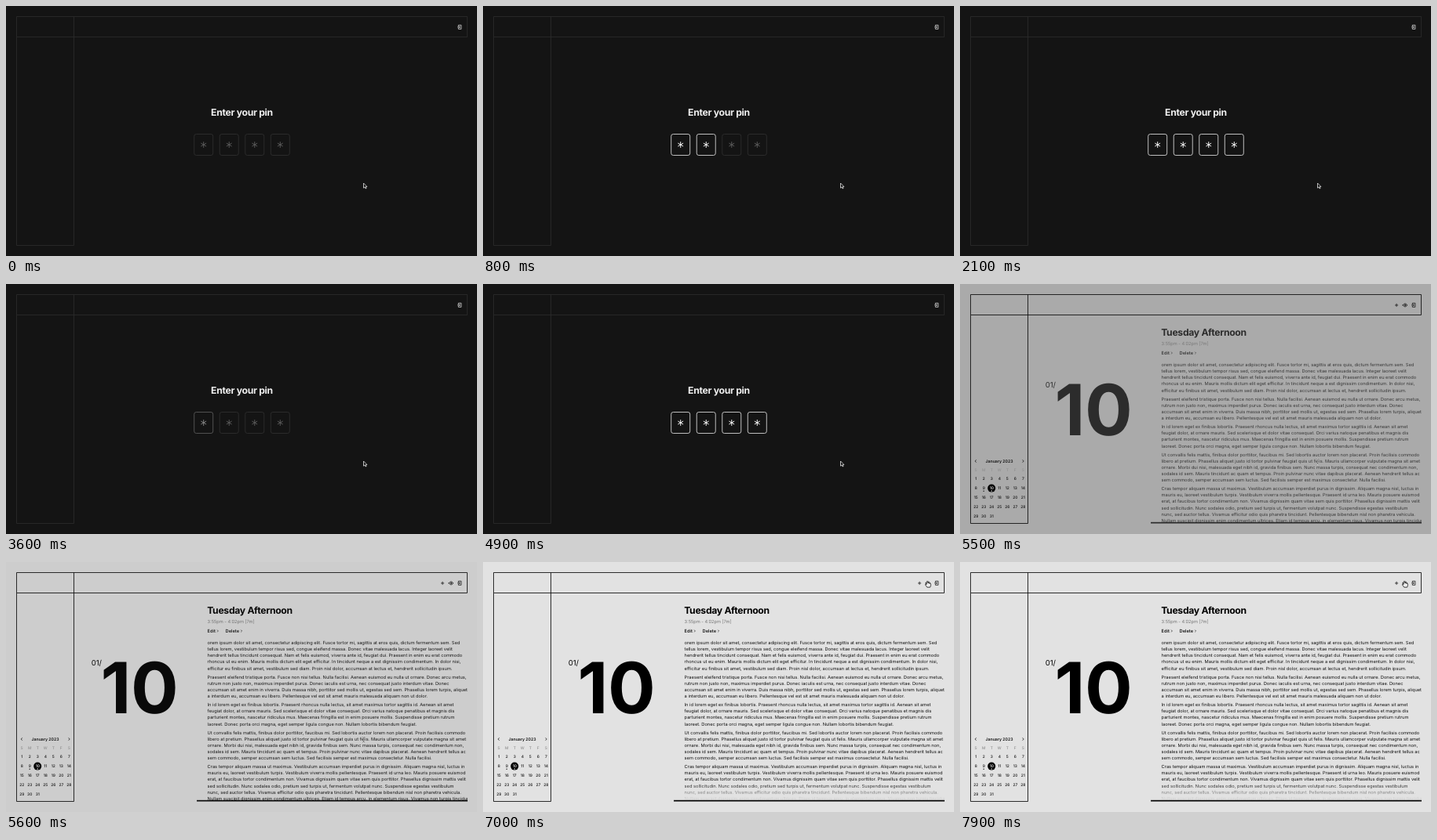
Write an HTML page that moves like this. It is 600 by 319 pixels and loops after 8000 ms.

```html
<!DOCTYPE html>
<html lang="en">
<head>
<meta charset="utf-8">
<title>Journal</title>
<style>
html, body { margin: 0; width: 100%; height: 100%; overflow: hidden; background: #141414; }
svg { display: block; width: 600px; height: 319px; --bg: #141414; --ink: #e2e2e2; --line: #2b2b2b; background: var(--bg); }
text { font-family: Inter, sans-serif; font-optical-sizing: none; text-rendering: geometricPrecision; white-space: pre; }
.grid { fill: none; stroke: var(--line); stroke-width: .85; }
.icon { fill: none; stroke: var(--ink); stroke-width: .75; stroke-linejoin: round; stroke-linecap: round; }
.title { font-size: 12.2px; font-weight: 700; letter-spacing: -.025em; }
.small { font-size: 5.7px; }
.mid { text-anchor: middle; }
.day { font-size: 4.9px; font-weight: 500; text-anchor: middle; }
.chev { fill: none; stroke: #111; stroke-width: .65; }
</style>
</head>
<body>
<svg viewBox="0 0 600 319">
  <defs>
    <linearGradient id="fade" x1="0" y1="0" x2="0" y2="1">
      <stop offset="0" style="stop-color: var(--bg); stop-opacity: 0"/>
      <stop offset=".9" style="stop-color: var(--bg); stop-opacity: .93"/>
    </linearGradient>
    <clipPath id="page"><rect x="250" y="90" width="338" height="214"/></clipPath>
  </defs>

  <path class="grid" d="M13.5 13.5H587.5V39.5H13.5ZM13.5 39.5V305.5H86.5V13.5"/>
  <path class="icon" d="M576.3 25.8V24.4H579.9V29.4H576.3V28M575.4 26.9H578.2M577.2 25.8L578.3 26.9L577.2 28"/>

  <g id="login">
    <text class="title mid" x="300.5" y="140.2" fill="#f0f0f0">Enter your pin</text>
    <g id="pins"></g>
  </g>

  <g id="app">
    <g class="icon">
      <path d="M554.4 27H557.8M556.1 25.3V28.7"/>
      <path d="M564.2 27Q567 22.8 569.8 27Q567 31.2 564.2 27Z"/>
      <circle cx="567" cy="27" r=".8"/>
      <path id="slash" d="M564.7 24.6L569.3 29.4"/>
    </g>
    <g id="calendar">
      <text class="mid" x="50" y="227.9" font-size="5.2" font-weight="600" style="fill: var(--ink)">January 2023</text>
      <path class="icon" d="M20.5 224.6L19.2 226L20.5 227.4M79.9 224.6L81.2 226L79.9 227.4"/>
      <circle cx="40.2" cy="260.6" r="5" fill="#000"/>
      <circle cx="30.2" cy="264.2" r=".7" fill="#111"/>
      <circle cx="40.2" cy="264" r=".7" fill="#fff"/>
    </g>
    <g id="entry">
      <text x="108.7" y="132" font-size="9.5">01/</text>
      <text x="120.5 159" y="193.3" font-size="90" font-weight="700">10</text>
      <text class="title" x="256.2" y="65.6">Tuesday Afternoon</text>
      <text class="small" x="256.6" y="78" font-weight="300" fill="#555">3:55pm - 4:02pm [7m]</text>
      <text class="small" x="256.6" y="90" font-weight="500">Edit</text>
      <text class="small" x="279.6" y="90" font-weight="500">Delete</text>
      <path class="chev" d="M269 86.6L270.4 88L269 89.4M299.2 86.6L300.6 88L299.2 89.4"/>
      <g clip-path="url(#page)"><g id="prose" fill="#111"></g></g>
      <rect id="veil" x="250" y="282" width="338" height="22" fill="url(#fade)"/>
      <rect x="243" y="303.8" width="345" height="1.7"/>
    </g>
  </g>

  <g id="cursor">
    <path id="arrow" d="M0 0V6.2L1.5 4.9L2.5 7L3.6 6.5L2.7 4.5H4.4Z" fill="#111" stroke="#fff" stroke-width=".7"/>
    <g id="beam" fill="none">
      <path d="M-1.6 -3.3Q0 -3.3 0 -2.4V2.4Q0 3.3 -1.6 3.3M1.6 -3.3Q0 -3.3 0 -2.4M0 2.4Q0 3.3 1.6 3.3" stroke="#fff" stroke-width="1.4"/>
      <path d="M-1.6 -3.3Q0 -3.3 0 -2.4V2.4Q0 3.3 -1.6 3.3M1.6 -3.3Q0 -3.3 0 -2.4M0 2.4Q0 3.3 1.6 3.3" stroke="#222" stroke-width=".6"/>
    </g>
    <path id="hand" d="M-1 .6Q-.1 -.6 .8 .6V2.4Q1.6 1.7 2.1 2.6Q3 2 3.4 2.9Q4.4 2.5 4.4 3.6V5Q4.3 6.3 3.6 7.6H-.3Q-1 6.3 -2.6 4.6Q-2.9 3.3 -1 4.2Z" fill="#eee" stroke="#111" stroke-width=".8" stroke-linejoin="round"/>
  </g>
</svg>
<script>
const prose = [
`orem ipsum dolor sit amet, consectetur adipiscing elit. Fusce tortor mi, sagittis at eros quis, dictum fermentum sem. Sed
tellus lorem, vestibulum tempor risus sed, congue eleifend massa. Donec vitae malesuada lacus. Integer laoreet velit
hendrerit tellus tincidunt consequat. Nam et felis euismod, viverra ante id, feugiat dui. Praesent in enim eu erat commodo
rhoncus ut eu enim. Mauris mollis dictum elit eget efficitur. In tincidunt neque a est dignissim condimentum. In dolor nisi,
efficitur eu finibus sit amet, vestibulum sed diam. Proin nisl dolor, accumsan at lectus et, hendrerit sollicitudin ipsum.`,
`Praesent eleifend tristique porta. Fusce non nisi tellus. Nulla facilisi. Aenean euismod eu nulla ut ornare. Donec arcu metus,
rutrum non justo non, maximus imperdiet purus. Donec iaculis est urna, nec consequat justo interdum vitae. Donec
accumsan sit amet enim in viverra. Duis massa nibh, porttitor sed mollis ut, egestas sed sem. Phasellus lorem turpis, aliquet
a interdum eu, accumsan eu libero. Pellentesque vel est sit amet mauris malesuada aliquam non ut dolor.`,
`In id lorem eget ex finibus lobortis. Praesent rhoncus nulla lectus, sit amet maximus tortor sagittis id. Aenean sit amet
feugiat dolor, at ornare mauris. Sed scelerisque et dolor vitae consequat. Orci varius natoque penatibus et magnis dis
parturient montes, nascetur ridiculus mus. Maecenas fringilla est in enim posuere mollis. Suspendisse pretium rutrum
laoreet. Donec porta orci magna, eget semper ligula congue non. Nullam lobortis bibendum feugiat.`,
`Ut convallis felis mattis, finibus dolor porttitor, faucibus mi. Sed lobortis auctor lorem non placerat. Proin facilisis commodo
libero at pretium. Phasellus aliquet justo id tortor pulvinar feugiat quis ut felis. Mauris ullamcorper vulputate magna sit amet
ornare. Morbi dui nisi, malesuada eget nibh id, gravida finibus sem. Nunc massa turpis, consequat nec condimentum non,
sodales id sem. Mauris tincidunt ac quam et tempus. Proin pulvinar nunc vitae dapibus placerat. Aenean hendrerit tellus ac
sem commodo, semper accumsan sem luctus. Sed facilisis semper est maximus consectetur. Nulla facilisi.`,
`Cras tempor aliquam massa ut maximus. Vestibulum accumsan imperdiet purus in dignissim. Aliquam magna nisl, luctus in
mauris eu, laoreet vestibulum turpis. Vestibulum viverra mollis pellentesque. Praesent id urna leo. Mauris posuere euismod
erat, at faucibus tortor condimentum non. Vivamus dignissim quam vitae sem quis porttitor. Phasellus dignissim mattis velit
sed sollicitudin. Nunc sodales odio, pretium sed turpis ut, fermentum volutpat nunc. Suspendisse egestas vestibulum
nunc, sed auctor tellus. Vivamus efficitur odio quis pharetra tincidunt. Pellentesque bibendum nisl non pharetra vehicula.
Nullam suscipit dignissim enim condimentum ultrices. Etiam id tempus arcu, in elementum risus. Vivamus non turpis tincidunt`];

const $ = id => document.getElementById(id);
const clamp = v => Math.min(1, Math.max(0, v));
const smooth = v => { v = clamp(v); return v * v * (3 - 2 * v); };
const mix = (a, b, k) => a + (b - a) * k;
const grey = v => `rgb(${[v, v, v].map(Math.round)})`;

let y = 105;
let lines = '';
for (const para of prose) {
  for (const line of para.split('\n')) {
    lines += `<text class="small" x="256.6" y="${y}">${line}</text>`;
    y += 8.15;
  }
  y += 2.85;
}
$('prose').innerHTML = lines;

const cell = (col, base, label, fill) =>
  `<text class="day" x="${20.2 + col * 10.02}" y="${base}" fill="${fill}">${label}</text>`;
let days = [...'SMTWTFS'].map((d, i) => cell(i, 238.8, d, '#909090')).join('');
for (let d = 1; d <= 31; d++) {
  const row = Math.floor((d - 1) / 7);
  days += cell((d - 1) % 7, 249.9 + row * 12.1, d, d === 10 ? '#fff' : '#111');
}
$('calendar').insertAdjacentHTML('beforeend', days);

$('pins').innerHTML = [0, 1, 2, 3].map(i => `<g transform="translate(${251.7 + i * 32.53} 177)" fill="none">
  <rect x="-12" y="-13.5" width="24" height="27" rx="2.6" stroke-width=".9"/>
  <path d="M0 -3.9V3.9M-3.4 -2L3.4 2M-3.4 2L3.4 -2" stroke-width="1"/></g>`).join('');
const pins = [...$('pins').children];

const tries = [[300, 600, 1300, 1900], [3600, 3900, 4300, 4700]];
const reveal = [.42, .73, .9, .96, .985, .994, .998, 1];
const tick = 100;

function pinLevel(i, t) {
  const rise = start => smooth((t - start + tick) / 300);
  const kept = 1 - smooth((t - 2700 + tick) / 600);
  return Math.max(rise(tries[0][i]) * kept, rise(tries[1][i]));
}

function pointer(t) {
  if (t < 5400) return ['arrow', 455.5, 226];
  const a = smooth((t - 5600) / 500);
  const b = smooth((t - 6200) / 800);
  const px = mix(mix(455.6, 549, a), 566, b);
  const py = mix(mix(226.8, 79, a), 24.6, b);
  return [t >= 6800 ? 'hand' : py > 100 ? 'beam' : 'arrow', px, py];
}

const show = (id, on) => { $(id).style.display = on ? '' : 'none'; };
const svg = document.querySelector('svg');

function draw(t) {
  const open = t >= 5400;
  const p = open ? reveal[Math.min(7, (t - 5400) / tick)] : 0;
  svg.style.setProperty('--bg', grey(mix(20, 226, p)));
  svg.style.setProperty('--ink', t < 5500 ? '#e2e2e2' : '#111');
  svg.style.setProperty('--line', open ? '#0c0c0c' : '#2b2b2b');
  show('login', !open);
  show('app', open);

  pins.forEach((pin, i) => {
    const k = pinLevel(i, t);
    pin.children[0].style.stroke = grey(mix(46, 210, k));
    pin.children[1].style.stroke = grey(mix(88, 245, k));
  });

  $('entry').style.opacity = clamp(1.27 * p - .183);
  $('veil').style.opacity = clamp((t - 5600) / 400);
  const hidden = t >= 7200 && t < 7900;
  $('prose').style.filter = hidden ? 'blur(1.6px)' : 'none';
  show('slash', hidden);

  const [shape, px, py] = pointer(t);
  for (const id of ['arrow', 'beam', 'hand']) show(id, id === shape);
  $('cursor').setAttribute('transform', `translate(${px} ${py})`);
}

function loop() {
  draw(Math.floor(performance.now() % 8000 / tick) * tick);
  requestAnimationFrame(loop);
}
loop();
</script>
</body>
</html>
```
